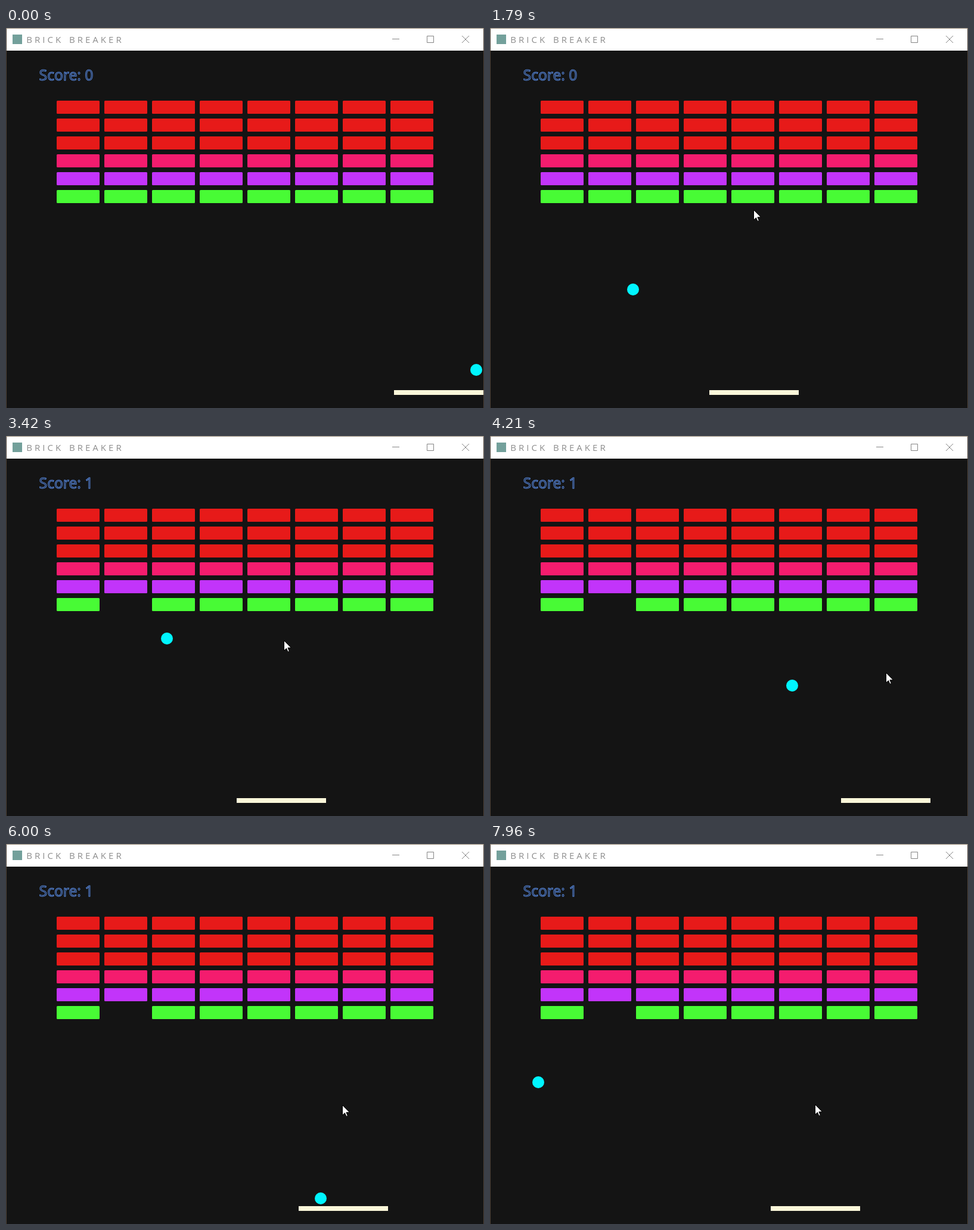
An HTML page that plays this animation: 802x638 px, repeating every 8000 ms.

```html
<!DOCTYPE html>
<html lang="en">
<head>
<meta charset="utf-8">
<title>Brick Breaker</title>
<style>
  html, body { margin: 0; width: 100%; height: 100%; overflow: hidden; background: #141414; }
  svg { display: block; width: 802px; height: 638px; }
  text { font-family: "Open Sans", "Noto Sans", sans-serif; white-space: pre; }
  .title { font-size: 15px; letter-spacing: 4px; word-spacing: 2px; fill: #8e8e8e; }
  .score { font-size: 24.7px; fill: #141414; stroke: #5b8fea; stroke-width: 1; }
  .buttons { fill: none; stroke: #858585; stroke-width: 1; }
</style>
</head>
<body>
<svg viewBox="0 0 802 638">
  <rect width="802" height="638" fill="#141414"/>
  <rect width="802" height="38" fill="#fff"/>
  <rect x="11" y="11" width="16" height="16" fill="#73a09b"/>
  <text class="title" x="34.3" y="25">BRICK BREAKER</text>
  <g class="buttons">
    <path d="M648 18.5h12M706.5 13.5h11v11h-11z"/>
    <path d="M765 13l12 12M777 13l-12 12"/>
  </g>
  <text class="score" id="score" x="55.6" y="88">Score: 0</text>
  <g id="bricks"></g>
  <rect id="paddle" y="608" width="150" height="8" fill="#fcf7da"/>
  <circle id="ball" r="10" fill="#00f5ff"/>
  <path id="cursor" d="M.5 .5V17.3L4.4 13.6L7 19.4L9.4 18.4L6.9 12.7H12.5Z" fill="#fff" stroke="#000"/>
  <path d="M0 .5H802" stroke="#8d7f6c"/>
  <path d="M.5 1V638M801.5 1V638" stroke="#4c4137"/>
</svg>
<script>
const LOOP = 8000, FRAME = 1000 / 24;
const LEFT = 12, RIGHT = 790.5, TOP = 308.5, BOTTOM = 598;
const START = { x: 789, y: 574 };
const HIT_TICK = (BOTTOM - START.y) + (BOTTOM - TOP);
const ROW_COLORS = ["#e71a19", "#e71a19", "#e71a19", "#f41c6e", "#c234fa", "#48fb35"];

// Time in ms, game tick: the game clock runs slightly unevenly
const clock = [[0, 0], [1000, 104], [4210, 423.8], [5210, 527], [LOOP, 805.4]];

// Time in ms, x, y: where the hand pauses or turns
const mouse = [
  [420, 804, 158], [970, 469, 267], [1800, 443, 306], [2590, 456, 335], [3290, 456, 341],
  [4210, 665, 398], [5000, 728, 432], [5300, 728, 432], [5900, 566, 439], [6900, 546, 438]
];

const $ = id => document.getElementById(id);
const linear = k => k;
const smooth = k => k * k * (3 - 2 * k);

function setAttrs(el, attrs) {
  for (const name in attrs) el.setAttribute(name, attrs[name]);
}

function sample(keys, at, ease) {
  let i = 1;
  while (i < keys.length - 1 && keys[i][0] < at) i++;
  const [t0, ...from] = keys[i - 1], [t1, ...to] = keys[i];
  const k = ease(Math.min(1, Math.max(0, (at - t0) / (t1 - t0))));
  return from.map((v, n) => Math.round(v + (to[n] - v) * k));
}

// Folds a straight path back and forth between two walls
function reflect(v, lo, hi) {
  const span = hi - lo, period = 2 * span;
  const p = ((v - lo) % period + period) % period;
  return lo + (p < span ? p : period - p);
}

ROW_COLORS.forEach((fill, row) => {
  for (let col = 0; col < 8; col++) {
    const brick = document.createElementNS("http://www.w3.org/2000/svg", "rect");
    setAttrs(brick, { x: 85 + col * 80, y: 122 + row * 30, width: 72, height: 22, rx: 1.5, fill });
    $("bricks").append(brick);
  }
});
const hitBrick = $("bricks").children[5 * 8 + 1];

function draw(now) {
  const frame = Math.floor((now % LOOP + 4) / FRAME);
  const time = Math.round(frame * FRAME / 10) * 10;

  const [tick] = sample(clock, time, linear);
  setAttrs($("ball"), {
    cx: reflect(START.x - 3 * tick, LEFT, RIGHT),
    cy: reflect(START.y + tick, TOP, BOTTOM)
  });

  const [x, y] = sample(mouse, time, smooth);
  setAttrs($("cursor"), { transform: `translate(${x - 1} ${y - 1})` });
  // The paddle trails the mouse by one frame
  const [center] = sample(mouse, time - 40, smooth);
  setAttrs($("paddle"), { x: Math.min(651, center - 75) });

  const hit = tick > HIT_TICK;
  setAttrs(hitBrick, { visibility: hit ? "hidden" : "visible" });
  $("score").textContent = "Score: " + Number(hit);
}

function loop() {
  draw(performance.now());
  requestAnimationFrame(loop);
}
loop();
</script>
</body>
</html>
```
